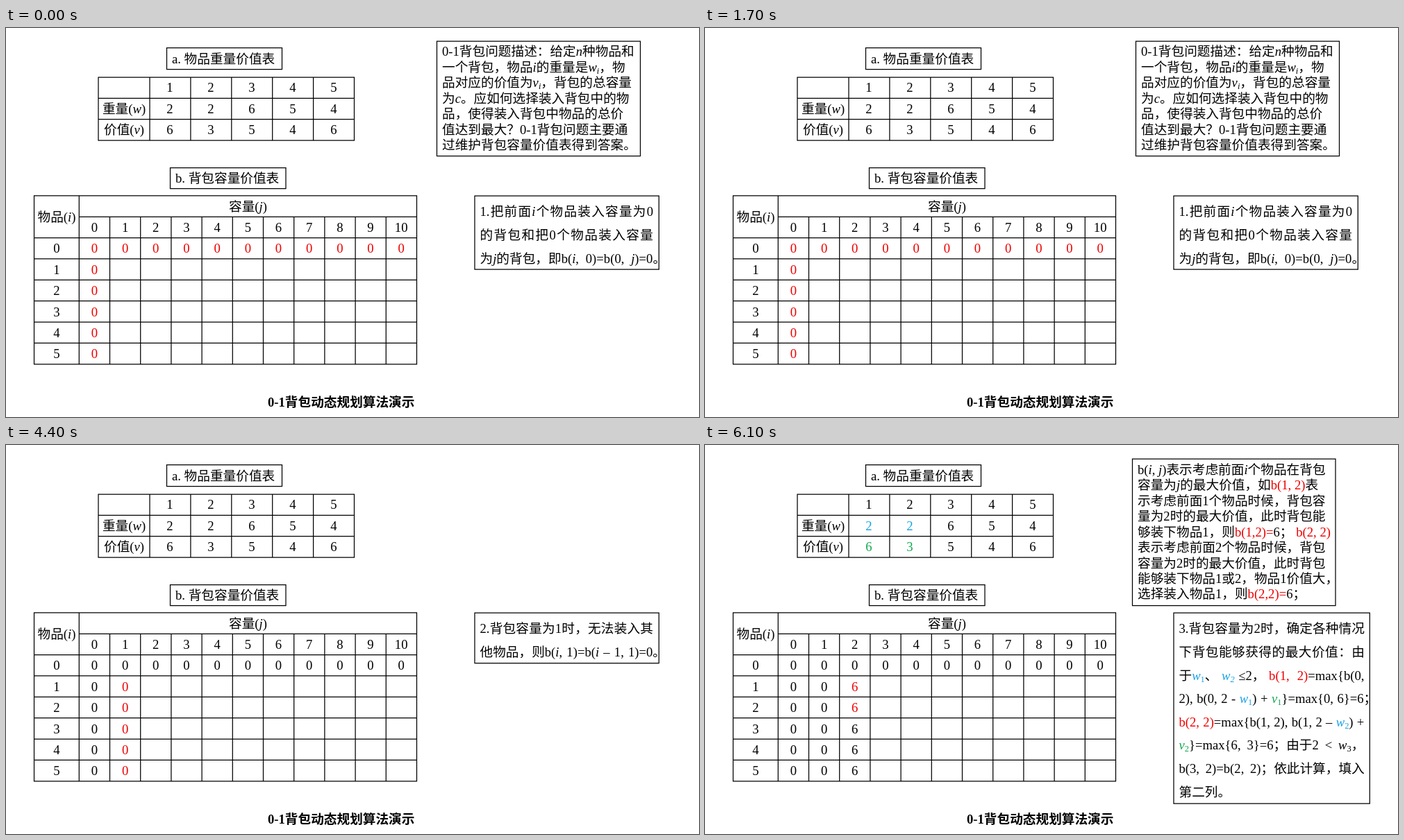
Recreate the animation shown at these times as an HTML page. Size 998x561 px, loop 8 s.

```html
<!DOCTYPE html>
<html lang="zh-CN">
<head>
<meta charset="utf-8">
<title>0-1背包动态规划算法演示</title>
<style>
  html, body { margin: 0; width: 100%; height: 100%; overflow: hidden; background: #fff; }
  #stage { position: relative; width: 998px; height: 561px; overflow: hidden; color: #000;
    font: 300 18.67px/30px "Liberation Serif", "Noto Sans CJK SC", "Noto Sans CJK", serif;
    text-spacing-trim: space-all; }
  .scene, svg { position: absolute; left: 0; top: 0; width: 998px; height: 561px; }
  svg { fill: none; stroke: #000; stroke-width: 1.25; }
  .line { position: absolute; height: 30px; white-space: nowrap; }
  .center { transform: translateX(-50%); }
  .justify { text-align: justify; text-align-last: justify; }
  .bold { font-weight: 700; }
  sub { font-size: .667em; line-height: 0; vertical-align: -.22em; }
  .red { color: #ee0000; }
  .blue { color: #1aa3e6; }
  .green { color: #12a84f; }
</style>
</head>
<body>
<div id="stage"></div>
<script>
const LOOP = 8000;
const stage = document.getElementById('stage');
const range = n => [...Array(n).keys()];
const paint = color => text => `<span class="${color}">${text}</span>`;
const red = paint('red'), blue = paint('blue'), green = paint('green');
const it = text => `<i>${text}</i>`;
const indexed = (name, k) => `${it(name)}<sub>${k}</sub>`;

// y is the vertical middle of the digits
function write(parent, x, y, html, cls = '', style = {}) {
  const el = document.createElement('div');
  el.className = 'line ' + cls;
  el.innerHTML = html;
  Object.assign(el.style, { left: x + 'px', top: y - 15 + 'px' }, style);
  parent.append(el);
}
const centered = (parent, x, y, html, color = '') => write(parent, x, y, html, 'center ' + color);

function draw(parent, path) {
  parent.insertAdjacentHTML('afterbegin', `<svg viewBox="0 0 998 561"><path d="${path}"/></svg>`);
}
const rect = (x1, y1, x2, y2) => `M${x1} ${y1}H${x2}V${y2}H${x1}Z`;

// A line is a string, or [string, 'justify'], or [string, extra word spacing]
function panel(parent, box, x, y, pitch, width, lines) {
  draw(parent, rect(...box));
  lines.forEach((line, k) => {
    const [html, mode] = [].concat(line);
    const style = mode === 'justify' ? { width: width + 'px' } : mode ? { wordSpacing: mode + 'px' } : {};
    write(parent, x, y + k * pitch, html, mode === 'justify' ? mode : '', style);
  });
}

// Fixed parts
const itemX = k => 236 + 59 * k;
const itemY = [86.3, 117, 147];
const colX = j => 127.4 + 44.18 * j;
const rowY = i => 318.4 + 30.4 * i;
const grid = [
  rect(231.5, 28.5, 397.5, 59.5), rect(236.5, 201.5, 403, 231.5),
  rect(133, 71, 501.5, 162), 'M133 101.3H501.5M133 131.6H501.5',
  ...range(5).map(k => `M${207 + 58.9 * k} 71V162`),
  rect(40.5, 241.8, 591.5, 484.8), 'M105.3 241.8V484.8M105.3 272.3H591.5',
  ...range(6).map(k => `M40.5 ${302.6 + 30.36 * k}H591.5`),
  ...range(10).map(k => `M${149.5 + 44.2 * k} 272.3V484.8`)
];
draw(stage, grid.join(''));
write(stage, 239, 45, 'a. 物品重量价值表');
write(stage, 244, 217, 'b. 背包容量价值表');
write(stage, 377, 539.5, '0-1背包动态规划算法演示', 'bold');
centered(stage, 170, itemY[1], `重量(${it('w')})`);
centered(stage, 170, itemY[2], `价值(${it('v')})`);
centered(stage, 73, 273, `物品(${it('i')})`);
centered(stage, 348.5, 257.5, `容量(${it('j')})`);
range(5).forEach(k => centered(stage, itemX(k), itemY[0], k + 1));
range(11).forEach(j => centered(stage, colX(j), 288.3, j));
range(6).forEach(i => centered(stage, 73, rowY(i), i));

// Changing parts
const weights = [2, 2, 6, 5, 4], values = [6, 3, 5, 4, 6];
const best = (i, j) => i && j > 1 ? 6 : 0;

function scene(start, end, { filled, isRed, marked = 0 }) {
  const el = document.createElement('div');
  el.className = 'scene';
  stage.append(el);
  range(5).forEach(k => {
    centered(el, itemX(k), itemY[1], weights[k], k < marked ? 'blue' : '');
    centered(el, itemX(k), itemY[2], values[k], k < marked ? 'green' : '');
  });
  range(6).forEach(i => range(11).forEach(j => {
    if (i === 0 || j <= filled) centered(el, colX(j), rowY(i), best(i, j), isRed(i, j) ? 'red' : '');
  }));
  const frames = [[0, start === 0], [start, true], [end, false], [LOOP, end === LOOP]]
    .map(([t, on]) => ({ offset: t / LOOP, opacity: on ? 1 : 0, easing: 'step-end' }))
    .filter((f, k) => !(k === 1 && start === 0) && !(k === 2 && end === LOOP));
  el.animate(frames, { duration: LOOP, iterations: Infinity });
  return el;
}

const first = scene(0, 2900, { filled: 0, isRed: () => true });
panel(first, [620.5, 19, 913.5, 184.5], 628, 34.3, 22.5, 0, [
  `0-1背包问题描述：给定${it('n')}种物品和`,
  `一个背包，物品${it('i')}的重量是${indexed('w', it('i'))}，物`,
  `品对应的价值为${indexed('v', it('i'))}，背包的总容量`,
  `为${it('c')}。应如何选择装入背包中的物`,
  '品，使得装入背包中物品的总价',
  '值达到最大？0-1背包问题主要通',
  '过维护背包容量价值表得到答案。'
]);
panel(first, [675, 242, 940.3, 348], 682.5, 265.3, 33.6, 249.5, [
  [`1.把前面${it('i')}个物品装入容量为0`, 'justify'],
  ['的背包和把0个物品装入容量', 'justify'],
  [`为${it('j')}的背包，即b(${it('i')}, 0)=b(0, ${it('j')})=0。`, 5.1]
]);

const second = scene(2900, 5300, { filled: 1, isRed: (i, j) => i > 0 && j === 1 });
panel(second, [675, 242, 940.3, 314.5], 682.5, 265.3, 33.6, 249.5, [
  ['2.背包容量为1时，无法装入其', 'justify'],
  [`他物品，则b(${it('i')}, 1)=b(${it('i')} – 1, 1)=0。`, 1.5]
]);

const third = scene(5300, LOOP, { filled: 2, marked: 2, isRed: (i, j) => j === 2 && (i === 1 || i === 2) });
panel(third, [615.5, 20, 908, 231.5], 623, 35.8, 22.45, 0, [
  `b(${it('i')}, ${it('j')})表示考虑前面${it('i')}个物品在背包`,
  `容量为${it('j')}的最大价值，如${red('b(1, 2)')}表`,
  '示考虑前面1个物品时候，背包容',
  '量为2时的最大价值，此时背包能',
  `够装下物品1，则${red('b(1,2)=')}6； ${red('b(2, 2)')}`,
  '表示考虑前面2个物品时候，背包',
  '容量为2时的最大价值，此时背包',
  '能够装下物品1或2，物品1价值大，',
  `选择装入物品1，则${red('b(2,2)=')}6；`
]);
panel(third, [675, 242, 957.3, 517], 682.5, 265.3, 33.6, 267.5, [
  ['3.背包容量为2时，确定各种情况', 'justify'],
  ['下背包能够获得的最大价值：由', 'justify'],
  [`于${blue(indexed('w', 1))}、 ${blue(indexed('w', it(2)))} ≤2， ${red('b(1,&nbsp; 2)')}=max{b(0,`, 0.9],
  [`2), b(0, 2 - ${blue(indexed('w', 1))}) + ${green(indexed('v', 1))}}=max{0, 6}=6；`, 0.8],
  [`${red('b(2, 2)')}=max{b(1, 2), b(1, 2 – ${blue(indexed('w', 2))}) +`, 0.6],
  [`${green(indexed('v', 2))}}=max{6, 3}=6；由于2 &lt; ${indexed('w', 3)}，`, 4.2],
  ['b(3, 2)=b(2, 2)；依此计算，填入', 4],
  '第二列。'
]);
</script>
</body>
</html>
```
